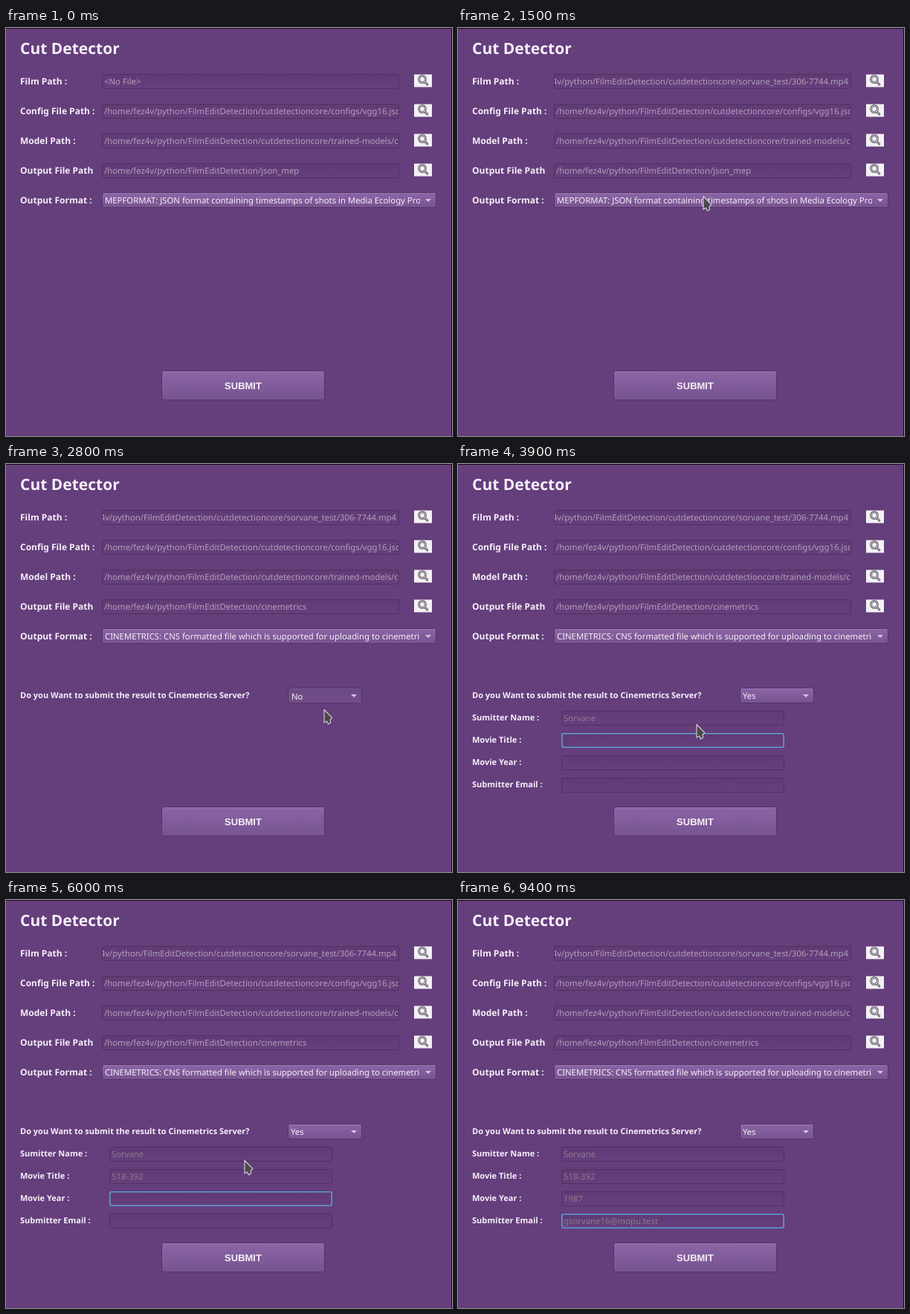
Write an HTML page with a canvas that moves like this. It is 600 px wide and 549 px high and loops after 9.5 s.

```html
<!DOCTYPE html>
<html lang="en">
<head>
<meta charset="utf-8">
<title>Cut Detector</title>
<style>
html, body { margin: 0; width: 100%; height: 100%; overflow: hidden; background: #653e7c; }
canvas { display: block; width: 600px; height: 549px; }
</style>
</head>
<body>
<canvas id="stage" width="600" height="549"></canvas>
<script>
const ctx = document.getElementById('stage').getContext('2d');
const LOOP = 9500, STEP = 100;
const SANS = '"Noto Sans", "Open Sans", sans-serif';
const BODY = '11.33px ' + SANS;
const HOME = '/home/fez4v/python/FilmEditDetection/';
const CORE = HOME + 'cutdetectioncore/';
const WHITE = '#f5eff8', PATH_INK = '#b19fbb', INPUT_INK = '#8b7a8e';

// Moments at which the form changes
const FILM_SET = 1500, POPUP_OPEN = 2000, FORMAT_SET = 2400, YES_SET = 2900;

const inputs = [
  { label: 'Sumitter Name :', text: 'Sorvane', focus: 3100, start: 3150, pace: 85 },
  { label: 'Movie Title :', text: '518-392', focus: 3800, start: 4400, pace: 190 },
  { label: 'Movie Year :', text: '1987', focus: 5900, start: 6150, pace: 170 },
  { label: 'Submitter Email :', text: 'gsorvane16@mopu.test', focus: 7050, start: 7080, pace: 85 }
];

// Pointer stops: time, x, y
const pointer = [
  [100, 592, 296], [300, 566, 140], [400, 561, 73], [600, 561, 73],
  [800, 300, 186], [900, 223, 205], [1200, 223, 205], [1500, 330, 226],
  [1800, 284, 232], [2000, 284, 236], [2200, 284, 256], [2400, 284, 256],
  [2600, 430, 311], [2700, 430, 311], [2800, 428, 330], [2900, 428, 330],
  [3100, 321, 350], [8700, 321, 350], [9000, 345, 478], [9300, 345, 478]
];

function text(str, x, y, font, color, align = 'left') {
  ctx.font = font;
  ctx.fillStyle = color;
  ctx.textAlign = align;
  ctx.fillText(str, x, y);
}

function clipped(x, y, w, h, draw) {
  ctx.save();
  ctx.beginPath();
  ctx.rect(x, y, w, h);
  ctx.clip();
  draw();
  ctx.restore();
}

function box(x, y, w, h, fill, stroke, line = 1) {
  ctx.beginPath();
  ctx.roundRect(x + line / 2, y + line / 2, w - line, h - line, 2.5);
  ctx.fillStyle = fill;
  ctx.fill();
  ctx.strokeStyle = stroke;
  ctx.lineWidth = line;
  ctx.stroke();
}

function shade(y, h, top, bottom) {
  const g = ctx.createLinearGradient(0, y, 0, y + h);
  g.addColorStop(0, top);
  g.addColorStop(1, bottom);
  return g;
}

function field(x, y, w, focused) {
  const fill = shade(y, 20, '#603a75', '#663f7d');
  if (focused) box(x, y, w, 20, fill, '#5b9fcb', 1.6);
  else box(x, y, w, 20, fill, '#50305f');
}

function raised(x, y, w, h, pressed) {
  const fill = pressed ? shade(y, h, '#6b4783', '#735089') : shade(y, h, '#8c65a6', '#76538f');
  box(x, y, w, h, fill, '#553467');
  ctx.fillStyle = pressed ? '#7a5790' : '#9a76b2';
  ctx.fillRect(x + 2, y + 1, w - 4, 1);
}

function combo(x, y, w, str, pressed) {
  const shift = pressed ? 1 : 0;
  raised(x, y, w, 21, pressed);
  clipped(x + 2, y, w - 24 + shift, 21, () =>
    text(str, x + 4 + shift, y + 15 + shift, BODY, WHITE));
  const cx = x + w - 11, cy = y + 9;
  ctx.fillStyle = '#d5c3df';
  ctx.beginPath();
  ctx.moveTo(cx - 4, cy);
  ctx.lineTo(cx + 4, cy);
  ctx.lineTo(cx, cy + 4);
  ctx.fill();
}

function searchButton(y) {
  ctx.fillStyle = '#f4f1f5';
  ctx.fillRect(549, y - 8.5, 24, 17);
  const lens = new Path2D();
  lens.arc(560, y - 2, 4.4, 0, 2 * Math.PI);
  lens.moveTo(563.2, y + 1.2);
  lens.lineTo(566.8, y + 5);
  ctx.lineCap = 'round';
  // Dark outline with a pale core
  for (const [color, width] of [['#625d66', 3], ['#d9d5dc', 1]]) {
    ctx.strokeStyle = color;
    ctx.lineWidth = width;
    ctx.stroke(lens);
  }
}

function pathRow(y, label, path, atEnd) {
  text(label, 19, y + 5, 'bold 12px ' + SANS, WHITE);
  field(129, y - 9, 400, false);
  clipped(130, y - 8, 398, 18, () =>
    text(path, atEnd ? 525 : 132, y + 5, BODY, PATH_INK, atEnd ? 'right' : 'left'));
  searchButton(y);
}

function inputRow(input, i, t) {
  const y = 341 + 30 * i;
  const next = inputs[i + 1];
  const focused = t >= input.focus && (!next || t < next.focus);
  const typed = Math.max(0, Math.min(input.text.length, Math.floor((t - input.start) / input.pace)));
  const str = input.text.slice(0, typed);
  text(input.label, 19, y + 4, 'bold 11px ' + SANS, WHITE);
  field(139, y - 9, 300, focused);
  text(str, 142, y + 5, BODY, INPUT_INK);
  const end = input.start + input.pace * input.text.length;
  if (focused && typed > 0 && t < end + 450) {
    ctx.fillStyle = '#c9bccf';
    ctx.fillRect(Math.round(142 + ctx.measureText(str).width), y - 7, 1, 16);
  }
}

function drawPointer(t) {
  const last = pointer[pointer.length - 1];
  if (t < pointer[0][0] || t > last[0]) return;
  const i = Math.max(1, pointer.findIndex(p => p[0] >= t));
  const [t0, x0, y0] = pointer[i - 1], [t1, x1, y1] = pointer[i];
  const k = (t - t0) / (t1 - t0);
  ctx.save();
  ctx.translate(x0 + (x1 - x0) * k, y0 + (y1 - y0) * k + 0.5);
  ctx.beginPath();
  ctx.moveTo(0, 0);
  ctx.lineTo(0, 17.5);
  ctx.lineTo(3.6, 15.5);
  ctx.lineTo(5.5, 19.5);
  ctx.lineTo(8.8, 17.5);
  ctx.lineTo(8, 14);
  ctx.lineTo(10.8, 11.2);
  ctx.closePath();
  ctx.fillStyle = '#4b484d';
  ctx.fill();
  ctx.lineWidth = 1.1;
  ctx.lineJoin = 'round';
  ctx.strokeStyle = '#d8d2db';
  ctx.stroke();
  ctx.restore();
}

function draw(t) {
  ctx.textRendering = 'geometricPrecision';
  ctx.fillStyle = '#653e7c';
  ctx.fillRect(0, 0, 600, 549);
  ctx.fillStyle = '#140c19';
  ctx.fillRect(0, 0, 600, 1);
  ctx.fillRect(599, 0, 1, 549);

  const cinemetrics = t >= FORMAT_SET;
  text('Cut Detector', 19, 35, 'bold 21px ' + SANS, WHITE);
  if (t >= FILM_SET) pathRow(71, 'Film Path :', CORE + 'sorvane_test/306-7744.mp4', true);
  else pathRow(71, 'Film Path :', '<No File>');
  pathRow(111, 'Config File Path :', CORE + 'configs/vgg16.json');
  pathRow(151, 'Model Path :', CORE + 'trained-models/cut_detector');
  pathRow(191, 'Output File Path', HOME + (cinemetrics ? 'cinemetrics' : 'json_mep'));

  text('Output Format :', 19, 236, 'bold 12px ' + SANS, WHITE);
  combo(129, 221, 450, cinemetrics
    ? 'CINEMETRICS: CNS formatted file which is supported for uploading to cinemetrics'
    : 'MEPFORMAT: JSON format containing timestamps of shots in Media Ecology Project',
    t >= POPUP_OPEN && !cinemetrics);

  if (cinemetrics) {
    text('Do you Want to submit the result to Cinemetrics Server?', 19, 315, 'bold 11px ' + SANS, WHITE);
    combo(379, 301, 100, t >= YES_SET ? 'Yes' : 'No', t >= 2700 && t < YES_SET);
  }
  if (t >= YES_SET) inputs.forEach((input, i) => inputRow(input, i, t));

  raised(209, 461, 220, 40, false);
  text('SUBMIT', 319, 486, 'bold 13px "Liberation Sans", Arial, sans-serif', WHITE, 'center');
  drawPointer(t);
}

const begin = performance.now();
function tick() {
  const elapsed = (performance.now() - begin) % LOOP;
  draw(Math.floor(elapsed / STEP) * STEP);
  requestAnimationFrame(tick);
}
tick();
</script>
</body>
</html>
```
